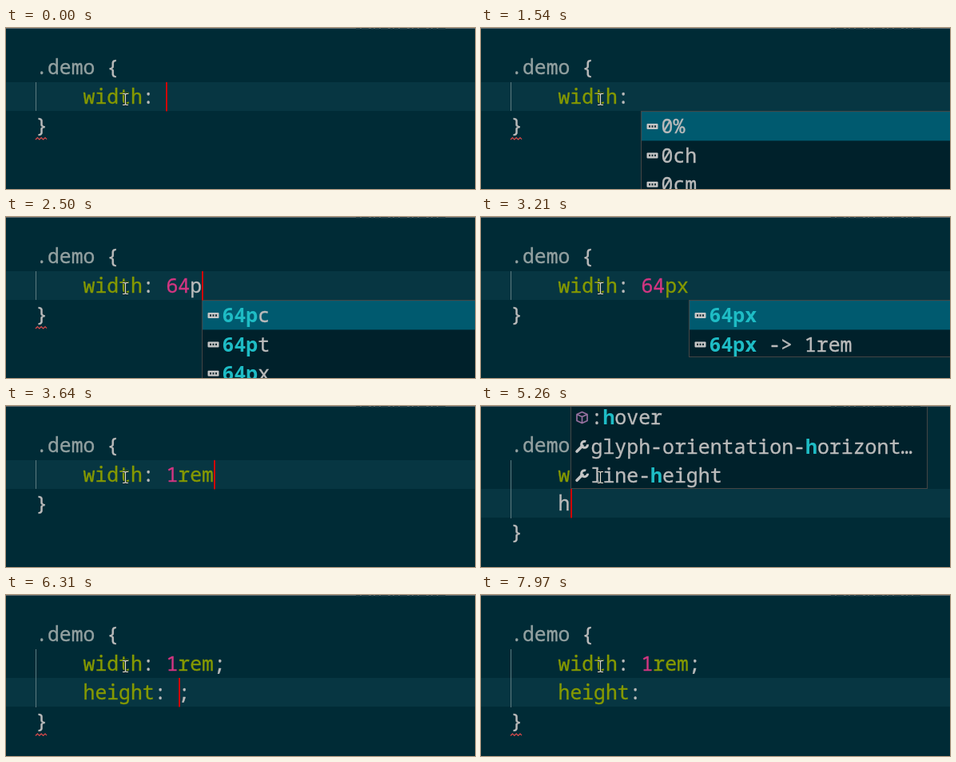
Animation, 587 px wide and 202 px high, one loop 8 s. Source, as an HTML page:

```html
<!DOCTYPE html>
<html lang="en">
<head>
<meta charset="utf-8">
<title>CSS unit completion</title>
<style>
  html, body { margin: 0; width: 100%; height: 100%; overflow: hidden; background: #002b36; }
  svg { display: block; width: 587px; height: 202px; }
  text {
    font: 24.74px "Noto Sans Mono", "DejaVu Sans Mono", monospace; white-space: pre;
    color: #bbb; fill: currentColor; stroke: currentColor; stroke-width: .35px;
  }
  .menu text { font-size: 24.87px; }
  .sel { color: #93a1a1; }
  .prop { color: #859900; }
  .num { color: #d33682; }
  .hit { color: #1ebcc5; font-weight: 700; stroke: none; }
</style>
</head>
<body>
<svg id="stage" viewBox="0 0 587 202"></svg>
<script>
const LOOP = 8000, LEFT = 37.2, CHAR = 14.845, ROW = 36.4;
const POP_W = 447;
const rowY = n => Math.round(31.6 + n * ROW);
const rect = (x, y, w, h, fill, more = '') =>
  `<rect x="${x}" y="${y}" width="${w}" height="${h}" fill="${fill}" ${more}/>`;
const text = (x, y, body) => `<text x="${x}" y="${y}">${body}</text>`;
const span = (cls, s) => `<tspan class="${cls}">${s}</tspan>`;
const esc = s => s.replace('>', '&gt;');

const icons = {
  unit: rect(0.5, -3.5, 14, 7, '#c5c5c5', 'rx="1"') +
    [3, 6.5, 10].map(x => rect(x, -1.2, 2, 2.4, '#1b3138')).join(''),
  wrench: '<path d="M1 6 8-1" stroke="#c5c5c5" stroke-width="3.6" stroke-linecap="round"/>' +
    '<path d="M12.2-6.3A4 4 0 1 0 14.6-2.6" fill="none" stroke="#c5c5c5" stroke-width="3"/>',
  cube: '<path d="M7.5-7 14-4V4L7.5 7 1 4V-4ZM1-4 7.5-1 14-4M7.5-1V7" fill="none" ' +
    'stroke="#97709f" stroke-width="1.7" stroke-linejoin="round"/>'
};

const width = v => span('prop', 'width') + ': ' + v;
const rem = span('num', '1') + span('prop', 'rem');
const height = end => span('prop', 'height') + ': ' + end;
const digits = (n, unit = '') => span('num', n) + unit;
const menu = (x, y, hit, items, sel = 0) => ({ x, y, hit, items, sel });
const units = (x, n, list, sel) =>
  menu(x, 104, n, list.map(u => ['unit', u]), sel);

const px = ['64px', '64px -> 1rem'];
const brace2 = [37, 137], brace3 = [37, 173.5], semi = [216, 137.5];

// Each step changes only the named parts of the state.
const steps = [
  [0, { a: width(''), b: null, cur: 200, row: 1, on: 1, err: brace2, pop: null }],
  [120, { pop: units(200, '', ['0%', '0ch', '0cm']) }],
  [520, { on: 0 }],
  [1110, { on: 1 }],
  [1540, { on: 0 }],
  [1940, { a: width(digits('6')), cur: 215, on: 1, pop: null }],
  [2220, { a: width(digits('64')), cur: 230 }],
  [2500, { a: width(digits('64', 'p')), cur: 245, pop: units(245, '64p', ['64pc', '64pt', '64px']) }],
  [2620, { a: width(digits('64', span('prop', 'px'))), cur: 260, pop: units(260, '64px', px) }],
  [3060, { on: 0 }],
  [3210, { err: null }],
  [3330, { pop: units(260, '64px', px, 1) }],
  [3640, { a: width(rem), on: 1, pop: null }],
  [4040, { on: 0 }],
  [4310, { a: width(rem + ';'), cur: 275, on: 1 }],
  [4460, { b: '', cur: 96, row: 2 }],
  [4860, { on: 0 }],
  [5140, { b: 'h', cur: 112, on: 1 }],
  [5260, { pop: menu(112, -5, 'h', [['cube', ':hover'],
    ['wrench', 'glyph-orientation-horizont…'], ['wrench', 'line-height']], -1) }],
  [5380, { b: 'hei', cur: 141, pop: menu(141, 141, 'hei',
    [['wrench', 'height'], ['wrench', 'line-height']]) }],
  [5780, { on: 0 }],
  [6030, { err: brace3 }],
  [6310, { b: height(';'), cur: 216, on: 1, pop: null }],
  [6710, { on: 0 }],
  [6990, { err: semi }],
  [7140, { cur: 230, on: 1 }],
  [7290, { b: height(''), cur: 216 }],
  [7820, { on: 0 }],
  [7970, { err: brace3 }]
];

let last = {};
const states = steps.map(([, change]) => last = { ...last, ...change });

function label(s, hit) {
  // In the long name only the last word start is marked.
  const at = !hit ? -1 : s.startsWith('glyph') ? s.lastIndexOf(hit) : s.indexOf(hit);
  if (at < 0) return esc(s);
  const end = at + hit.length;
  return s.slice(0, at) + span('hit', hit) + esc(s.slice(end));
}

function drawMenu({ x, y, hit, items, sel }) {
  const h = items.length * ROW;
  let out = rect(x + 0.5, y + 0.5, POP_W - 1, Math.floor(h) - 1, '#00212b', 'stroke="#454545"');
  items.forEach(([icon, s], i) => {
    const top = y + i * ROW;
    if (i === sel) out += rect(x + 1, top + 1, POP_W - 2, ROW, '#005a6f');
    out += `<g transform="translate(${x + 7} ${top + 19.5})">${icons[icon]}</g>`;
    out += text(x + 25.5, top + 28.3, label(s, hit));
  });
  return `<g class="menu">${out}</g>`;
}

const squiggle = ([x, y]) =>
  `<path d="M${x} ${y + 3}l2.4-2.4 2.4 2.4 2.4-2.4 2.4 2.4 2.4-2.4 2 2" fill="none" stroke="#e34b4b" stroke-width="1.2"/>`;

const beam = '<path d="M146 82.5h2.5l1 1 1-1h2.5M149.5 83.5v12M146 96.5h2.5l1-1 1 1h2.5" fill="none" ';
const mouse = beam + 'stroke="#10252b" stroke-width="2.6"/>' + beam + 'stroke="#e4dfd2" stroke-width="1.1"/>';

function draw(s) {
  const lines = s.b === null ? 1 : 2;
  const line = (n, col, body) => text(LEFT + col * CHAR, 58.2 + n * ROW, body);
  let out = rect(0, 0, 587, 202, '#002b36') +
    rect(0, rowY(s.row), 587, 36, '#073642') +
    rect(37, 68, 1, lines === 1 ? 36 : 73, '#5c7a7f') +
    line(0, 0, span('sel', '.demo') + ' {') +
    line(1, 4, s.a) +
    (s.b ? line(2, 4, s.b) : '') +
    line(lines + 1, 0, '}');
  if (s.err) out += squiggle(s.err);
  if (s.pop) out += drawMenu(s.pop);
  if (s.on) out += rect(s.cur, rowY(s.row), 2, 36.5, '#d00000');
  return out + mouse + rect(0, 0, 587, 1, '#5f6c70') +
    '<path d="M438 .8h114" stroke="#2c464e" stroke-width="1.4" stroke-dasharray="5 2 9 3 3 2"/>';
}

const stage = document.getElementById('stage');
let shown = -1;
const start = performance.now();

function tick() {
  const t = (performance.now() - start) % LOOP;
  let i = steps.length - 1;
  while (steps[i][0] > t) i--;
  if (i !== shown) stage.innerHTML = draw(states[shown = i]);
  requestAnimationFrame(tick);
}
tick();
</script>
</body>
</html>
```
